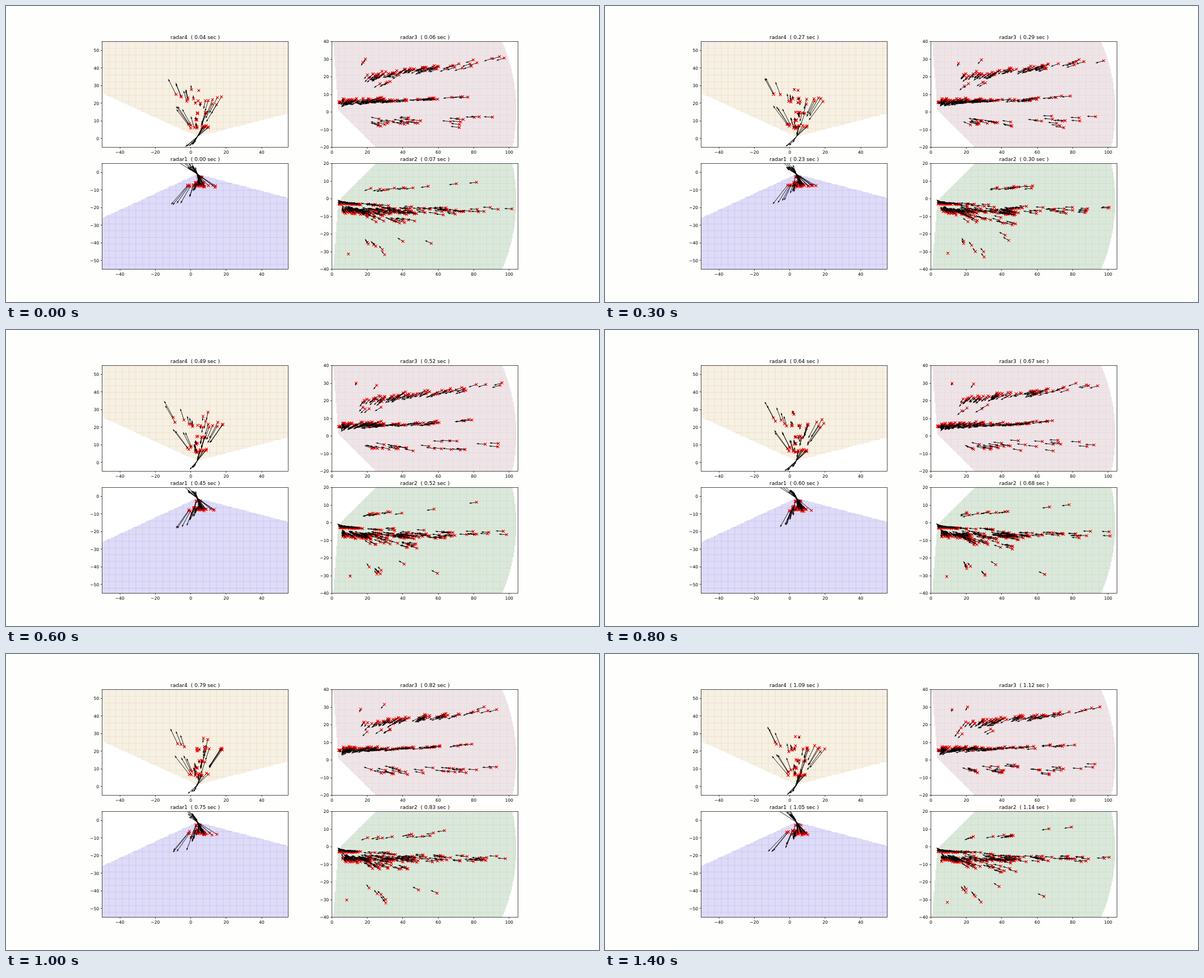
Write an HTML page with a canvas that moves like this. It is 1058x529 px and loops after 1500 ms.

```html
<!DOCTYPE html>
<html lang="en">
<head>
<meta charset="utf-8">
<title>Radar detections</title>
<style>
  html, body { margin: 0; width: 100%; height: 100%; overflow: hidden; background: #fefefc; }
  canvas { display: block; }
</style>
</head>
<body>
<canvas id="stage" width="1058" height="529"></canvas>
<script>
const ctx = document.getElementById('stage').getContext('2d');
const W = 1058, H = 529, PLOT_W = 332, PLOT_H = 189;
const COLS = 105, ROWS = 60, UX = PLOT_W / COLS, UY = PLOT_H / ROWS;
const STEPS = 15, STEP_MS = 100, CELL = .5, MESH = 3.8;
const FONT = '"DejaVu Sans", sans-serif';

// side: sensor looks along the plot's vertical axis; front: along its horizontal axis
const side = { left: 171.5, xMin: -50, tickStep: 20, speed: 70 };
const front = { left: 581.5, xMin: 0, tickStep: 20, speed: 16 };

// clock: [first second, seconds per step]
// clusters: [count, x from, x to, crowding toward x from, y at x = 0, slope, spread]
const radars = [
  {
    ...side, name: 'radar4', top: 63.5, yMax: 55, site: [3.7, 1], clock: [.04, .075],
    fill: '#f6f0e5', mesh: '#ead8ac',
    covers: (x, y) => y > (x < 0 ? -.46 : .259) * x,
    clusters: [
      [14, 2, 10, 1.3, 6, .1, 1.2], [5, 2.5, 4, 1, 10.6, 0, .6], [4, -2, 1, 1, 8, 0, 2.5],
      [7, 3, 9, 1, 14.5, 0, .7], [10, -3, 11, 1, 21.3, 0, 2.4],
      [3, -10, -3, 1, 22, -.3, 2], [5, 12, 21, 1, 20, .1, 3], [2, 0, 10, 1, 27.5, 0, 1.5]]
  },
  {
    ...front, name: 'radar3', top: 63.5, yMax: 40, site: [3.7, 1], clock: [.062, .0757],
    fill: '#ece5e8', mesh: '#fac9cf',
    covers: (x, y) => x > (y > 0 ? -.08 : -1) * y && Math.hypot(x, y) < 100.3,
    clusters: [
      [8, 3.8, 5, 1, 5.5, 0, .4], [65, 6, 30, 1.4, 6.2, .025, 1.7], [26, 28, 60, 1.3, 5.6, .03, 1],
      [6, 55, 82, 1, 6.3, .03, 1], [28, 17, 38, .8, 18.8, .1, 2.2], [28, 37, 65, 1, 20.3, .08, 1.6],
      [9, 62, 82, 1, 20.5, .08, 1.8], [4, 78, 98, 1, 24, .06, 2], [4, 14, 36, 1, 13.5, .1, 1.5],
      [2, 9, 30, 1, 30, 0, 3], [13, 22, 43, 1, -6.2, 0, 2.6], [12, 42, 76, 1, -5.6, 0, 3.6],
      [3, 78, 94, 1, -4, 0, 2.5]]
  },
  {
    ...side, name: 'radar1', top: 281.5, yMax: 5, site: [3.7, -1], clock: [.004, .075],
    fill: '#dedbf6', mesh: '#bab8fc',
    covers: (x, y) => y < (x < 0 ? .465 : -.263) * x,
    clusters: [
      [26, 2.5, 8, 1, -7, 0, 1.6], [6, 3, 6.5, 1, -2.8, 0, .4], [6, 1.5, 4, 1, -6.5, 0, 1.5],
      [9, 6, 15, 1.3, -6.8, -.1, 1.3], [4, -2, 1, 1, -8, 0, 2.2]]
  },
  {
    ...front, name: 'radar2', top: 281.5, yMax: 20, site: [3.7, -1], clock: [.067, .0763], speed: 14,
    fill: '#dce7dc', mesh: '#b8e2b8',
    covers: (x, y) => x > (y < 0 ? .08 : 1) * y && Math.hypot(x, y) < 100.3,
    clusters: [
      [36, 4, 16, 1.4, -2.6, -.03, .4], [9, 15, 36, 1, -2.6, -.04, .9],
      [58, 6, 22, 1.2, -6.2, -.1, 1.8], [46, 20, 48, 1, -6.5, -.02, 2.4], [20, 20, 48, 1, -8, -.12, 2.6],
      [22, 42, 65, 1, -7, 0, 3], [15, 62, 88, 1, -6.6, 0, 2.3], [3, 86, 102, 1, -6, 0, 2],
      [9, 20, 56, 1.3, 4.2, .05, 1], [2, 56, 82, 1, 2, .1, 2], [6, 18, 32, 1, -14, -.55, 3],
      [2, 36, 66, 1, -10, -.3, 4], [1, 8, 11, 1, -31, 0, 2]]
  }
];

const px = (r, x) => r.left + (x - r.xMin) * UX;
const py = (r, y) => r.top + (r.yMax - y) * UY;
const snap = v => Math.floor(v) + .5;

function random(seed) {
  return () => {
    seed = (seed + 0x6D2B79F5) | 0;
    let v = Math.imul(seed ^ seed >>> 15, 1 | seed);
    v = v + Math.imul(v ^ v >>> 7, 61 | v) ^ v;
    return ((v ^ v >>> 14) >>> 0) / 4294967296;
  };
}

function clipToPlot(c, r) {
  c.beginPath();
  c.rect(r.left, r.top, PLOT_W, PLOT_H);
  c.clip();
}

// Coverage area in rows of small cells, with a faint mesh
function drawField(c, r) {
  c.save();
  clipToPlot(c, r);
  c.fillStyle = '#fff';
  c.fillRect(r.left, r.top, PLOT_W, PLOT_H);

  c.beginPath();
  for (let j = 0; j < ROWS; j += CELL) {
    const y = r.yMax - j;
    let first = null, last;
    for (let i = 0; i < COLS; i += CELL) {
      const x = r.xMin + i;
      if (!r.covers(x + CELL / 2 - r.site[0], y - CELL / 2 - r.site[1])) continue;
      first ??= x;
      last = x + CELL;
    }
    if (first === null) continue;
    const y0 = Math.round(py(r, y)), y1 = Math.round(py(r, y - CELL));
    c.rect(px(r, first), y0, (last - first) * UX, y1 - y0);
  }
  c.fillStyle = r.fill;
  c.fill();
  c.clip();

  c.strokeStyle = r.mesh;
  c.globalAlpha = .5;
  c.lineWidth = 1;
  c.beginPath();
  for (let d = MESH; d < COLS; d += MESH) {
    const x = snap(r.left + d * UX), y = snap(r.top + d * UY);
    c.moveTo(x, r.top);
    c.lineTo(x, r.top + PLOT_H);
    c.moveTo(r.left, y);
    c.lineTo(r.left + PLOT_W, y);
  }
  c.stroke();
  c.restore();
}

function drawAxes(r) {
  const bottom = r.top + PLOT_H;
  const label = v => String(v).replace('-', '\u2212');
  ctx.strokeStyle = ctx.fillStyle = '#000';
  ctx.lineWidth = .7;
  ctx.font = '7.65px ' + FONT;
  ctx.strokeRect(r.left, r.top, PLOT_W, PLOT_H);
  ctx.beginPath();
  ctx.textAlign = 'center';
  for (let v = Math.ceil(r.xMin / 20) * 20; v <= r.xMin + COLS; v += 20) {
    const x = px(r, v);
    ctx.moveTo(snap(x), bottom);
    ctx.lineTo(snap(x), bottom + 2.7);
    ctx.fillText(label(v), x, bottom + 11.1);
  }
  ctx.textAlign = 'right';
  for (let v = Math.ceil((r.yMax - ROWS) / 10) * 10; v <= r.yMax; v += 10) {
    const y = py(r, v);
    ctx.moveTo(r.left, snap(y));
    ctx.lineTo(r.left - 2.7, snap(y));
    ctx.fillText(label(v), r.left - 5.4, y + 2.9);
  }
  ctx.stroke();
}

function drawTitle(r, step) {
  const sec = (r.clock[0] + r.clock[1] * step + 1e-6).toFixed(2);
  ctx.font = '9.18px ' + FONT;
  ctx.textAlign = 'center';
  ctx.fillText(`${r.name}\u00a0 ( ${sec} sec )`, r.left + PLOT_W / 2, r.top - 4.5);
}

// A fresh scan of every cluster for each step
function scan(r, seed) {
  const rnd = random(seed), list = [];
  for (const [count, x0, x1, crowd, y0, slope, spread] of r.clusters) {
    for (let k = 0; k < count; k++) {
      const x = x0 + (x1 - x0) * rnd() ** crowd;
      list.push([x, y0 + slope * x + spread * (rnd() + rnd() - 1)]);
    }
  }
  return list;
}

function drawArrow(x, y, dx, dy) {
  const len = Math.hypot(dx, dy);
  if (len < .5) return;
  const ux = dx / len, uy = dy / len, head = Math.min(4.5, len), wide = head * .3;
  const tx = x + dx, ty = y + dy, bx = tx - ux * head, by = ty - uy * head;
  ctx.beginPath();
  ctx.moveTo(x, y);
  ctx.lineTo(bx, by);
  ctx.stroke();
  ctx.beginPath();
  ctx.moveTo(tx, ty);
  ctx.lineTo(bx - uy * wide, by + ux * wide);
  ctx.lineTo(bx + uy * wide, by - ux * wide);
  ctx.fill();
}

function drawEchoes(r, list) {
  ctx.save();
  clipToPlot(ctx, r);
  ctx.strokeStyle = '#f00';
  ctx.lineWidth = 1.15;
  ctx.beginPath();
  for (const [ex, ey] of list) {
    const x = px(r, ex), y = py(r, ey), a = 2.4;
    ctx.moveTo(x - a, y - a);
    ctx.lineTo(x + a, y + a);
    ctx.moveTo(x - a, y + a);
    ctx.lineTo(x + a, y - a);
  }
  ctx.stroke();
  ctx.strokeStyle = ctx.fillStyle = '#000';
  ctx.lineWidth = .85;
  // Each arrow is the radial part of a common leftward motion
  for (const [x, y] of list) {
    const dx = x - r.site[0], dy = y - r.site[1];
    const k = -r.speed * dx / (dx * dx + dy * dy || 1);
    drawArrow(px(r, x), py(r, y), k * dx, -k * dy);
  }
  ctx.restore();
}

const field = document.createElement('canvas');
field.width = W;
field.height = H;
const back = field.getContext('2d');
back.fillStyle = '#fefefc';
back.fillRect(0, 0, W, H);
radars.forEach(r => drawField(back, r));

let shown = -1;
function draw(step) {
  ctx.drawImage(field, 0, 0);
  radars.forEach((r, n) => {
    drawEchoes(r, scan(r, step * 97 + n * 1009 + 5));
    drawAxes(r);
    drawTitle(r, step);
  });
  shown = step;
}

const start = performance.now();
function tick(now) {
  const step = Math.floor(Math.max(0, now - start) / STEP_MS) % STEPS;
  if (step !== shown) draw(step);
  requestAnimationFrame(tick);
}
draw(0);
requestAnimationFrame(tick);
</script>
</body>
</html>
```
